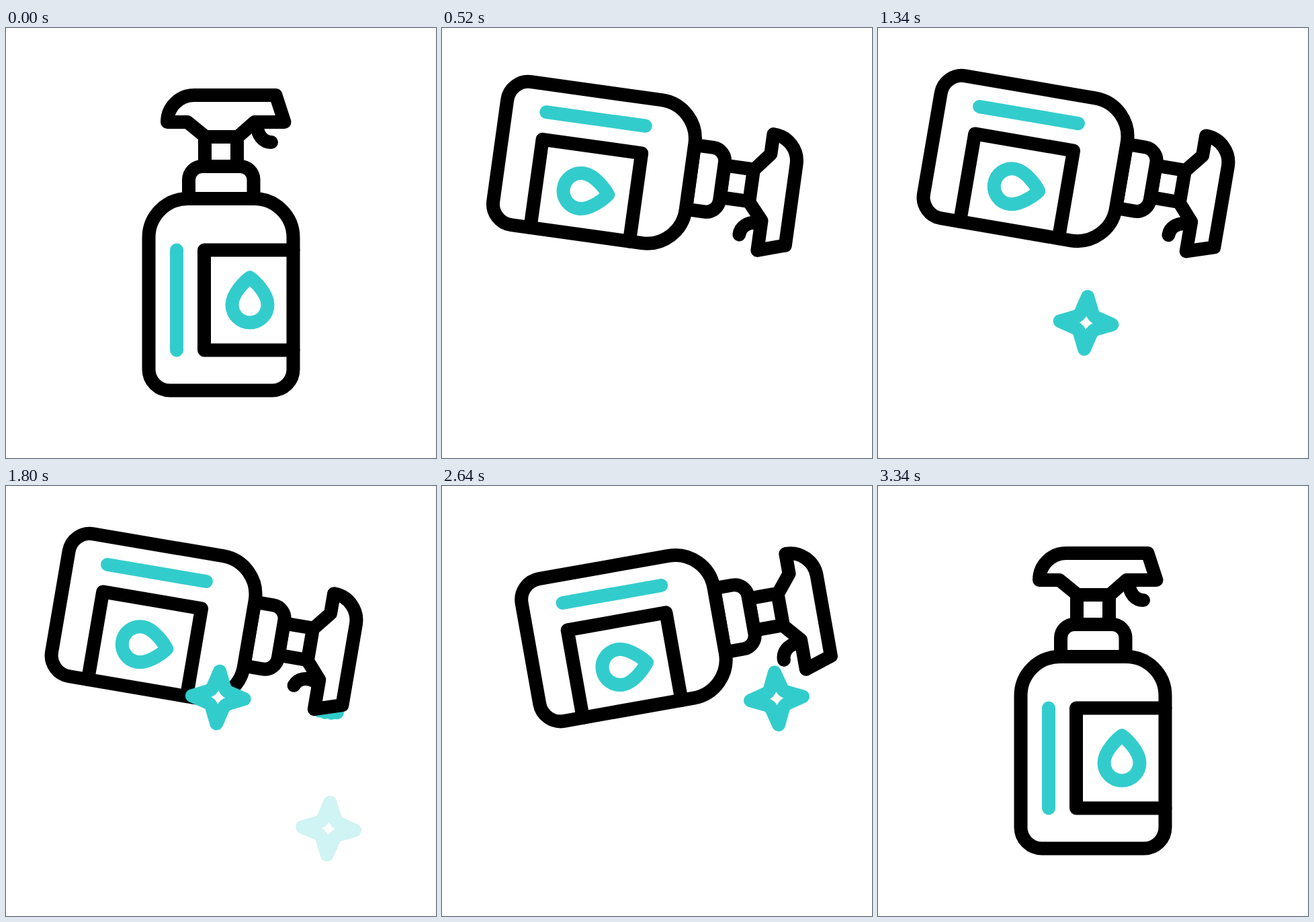
An HTML page for the animation above (3600 ms loop, 640 by 640 pixels).

```html
<!DOCTYPE html>
<html lang="en">
<head>
<meta charset="utf-8">
<title>Spray bottle</title>
<style>
  html, body { margin: 0; width: 100%; height: 100%; overflow: hidden; background: #fff; }
  svg { display: block; width: 100vw; height: 100vh; }
  .ink, .teal { fill: #fff; stroke: #000; stroke-width: 20; stroke-linecap: round; stroke-linejoin: round; }
  .teal { stroke: #3cc; }
  .line { fill: none; }
  #spray { fill: #3cc; }
</style>
</head>
<body>
<svg viewBox="0 0 640 640">
  <defs>
    <path id="spark" class="teal" d="M0-39 L8-17 Q10-10 17-8 L39 0 L17 8 Q10 10 8 17 L0 39 L-8 17 Q-10 10-17 8 L-39 0 L-17-8 Q-10-10-8-17 Z"/>
  </defs>
  <g id="spray"></g>
  <g id="bottle" class="ink">
    <path id="trigger" class="line" d="M374 145 C374 160 383 170 395 170"/>
    <path d="M296 162 V206 H344 V162"/>
    <path d="M240 140 H270 L297 162 H345 L370 140 H414.500 L401.500 100 H280 A40 40 0 0 0 240 140 Z"/>
    <path d="M272 254 V226 A20 20 0 0 1 292 206 H348 A20 20 0 0 1 368.500 226 V254 Z"/>
    <path d="M212.500 312 A58 58 0 0 1 270.500 254 H369.500 A58 58 0 0 1 427.500 312 V508 A31.500 31.500 0 0 1 396 539.500 H244 A31.500 31.500 0 0 1 212.500 508 Z"/>
    <path class="line" d="M427.500 330.500 H295 V479.500 H427.500"/>
    <path class="teal" d="M254 330.500 V479.500"/>
    <path class="teal" d="M363 371.500 C358 375 336.500 394 336.500 412 A26.500 26.500 0 0 0 389.500 412 C389.500 394 368 375 363 371.500 Z"/>
  </g>
  <use id="star1" href="#spark"/>
  <use id="star2" href="#spark"/>
</svg>
<script>
const LOOP = 3600, TILT = 99.7, CYCLE = 860, FIRST = 840;
const $ = id => document.getElementById(id);
const clamp = v => Math.min(1, Math.max(0, v));
const ramp = (t, a, b) => clamp((t - a) / (b - a));
const ease = u => u < .5 ? .5 * (2 * u) ** 2.4 : 1 - .5 * (2 - 2 * u) ** 2.4;

// Piecewise linear value through [time, value] points
function track(t, points) {
  let [t0, v0] = points[0];
  for (const [t1, v1] of points) {
    if (t < t1) return t1 === t0 ? v1 : v0 + (v1 - v0) * ramp(t, t0, t1);
    [t0, v0] = [t1, v1];
  }
  return v0;
}

// Where the droplets stand at full spread
const drops = [[474, 426], [425, 476], [469, 479], [510, 482],
               [382, 521], [432, 534], [485, 540], [534, 536]].map(([x, y]) => {
  const el = document.createElementNS("http://www.w3.org/2000/svg", "circle");
  el.setAttribute("r", 10.3);
  $("spray").append(el);
  return { el, x, y };
});

// The bottle rises early, slides left late, and both lag a little near the end
function drawBottle(t, kick, squeeze) {
  const p = ease(ramp(t, 10, 594)) - ease(ramp(t, 2437, 3037));
  const lag = p ** 12 * (1 - p);
  const x = 320 - 98.7 * (p ** 3.2 - .7 * lag) + kick;
  const y = 397 - 201 * (p ** .6 - 1.3 * lag) - 5.1 * kick;
  const angle = TILT * p - 2.2 * kick;
  $("bottle").setAttribute("transform", `translate(${x} ${y}) rotate(${angle}) translate(-320 -397)`);
  $("trigger").setAttribute("transform", `rotate(${45 * squeeze} 374 145)`);
}

function drawSpray(phase, kick) {
  const spread = (phase - 35) * .0026;
  const x0 = 484 + 9 * kick, y0 = 296 - 13 * kick;
  const on = phase > 35 && phase < 482;
  $("spray").setAttribute("opacity", on ? 1 - ramp(phase, 330, 482) : 0);
  for (const { el, x, y } of drops) {
    el.setAttribute("cx", x0 + (x - x0) * spread);
    el.setAttribute("cy", y0 + (y - y0) * spread);
  }
}

// Rises with a soft start, then at constant speed
function drawStar(id, t, s) {
  const age = Math.max(0, t - s.go), soft = 340;
  const rise = .27 * (age < soft ? age * age / (2 * soft) : age - soft / 2);
  const turn = 4.5 * Math.sin(Math.PI * (t - 1000) / 1120);
  $(id).setAttribute("transform", `translate(${track(t, s.x)} ${s.y - rise}) rotate(${turn})`);
  $(id).setAttribute("opacity", ramp(t, s.show, s.show + 230) - ramp(t, s.end - 220, s.end));
}

const star1 = { show: 862, go: 1000, end: 2460, y: 485, x: [[1000, 305], [1800, 315.7], [2120, 318.5], [2460, 320]] };
const star2 = { show: 1750, go: 1750, end: 3340, y: 511, x: [[1800, 480], [2120, 493.6], [2640, 498], [3000, 495]] };

function draw() {
  const t = performance.now() % LOOP;
  const spraying = t >= FIRST && t < FIRST + 2 * CYCLE;
  const phase = spraying ? (t - FIRST) % CYCLE : 0;
  const kick = ramp(phase, 100, 160) - ramp(phase, 360, 420);
  const squeeze = ramp(phase, 50, 160) - ramp(phase, 360, 470);
  drawBottle(t, kick, squeeze);
  drawSpray(phase, kick);
  drawStar("star1", t, star1);
  drawStar("star2", t, star2);
  requestAnimationFrame(draw);
}
draw();
</script>
</body>
</html>
```
